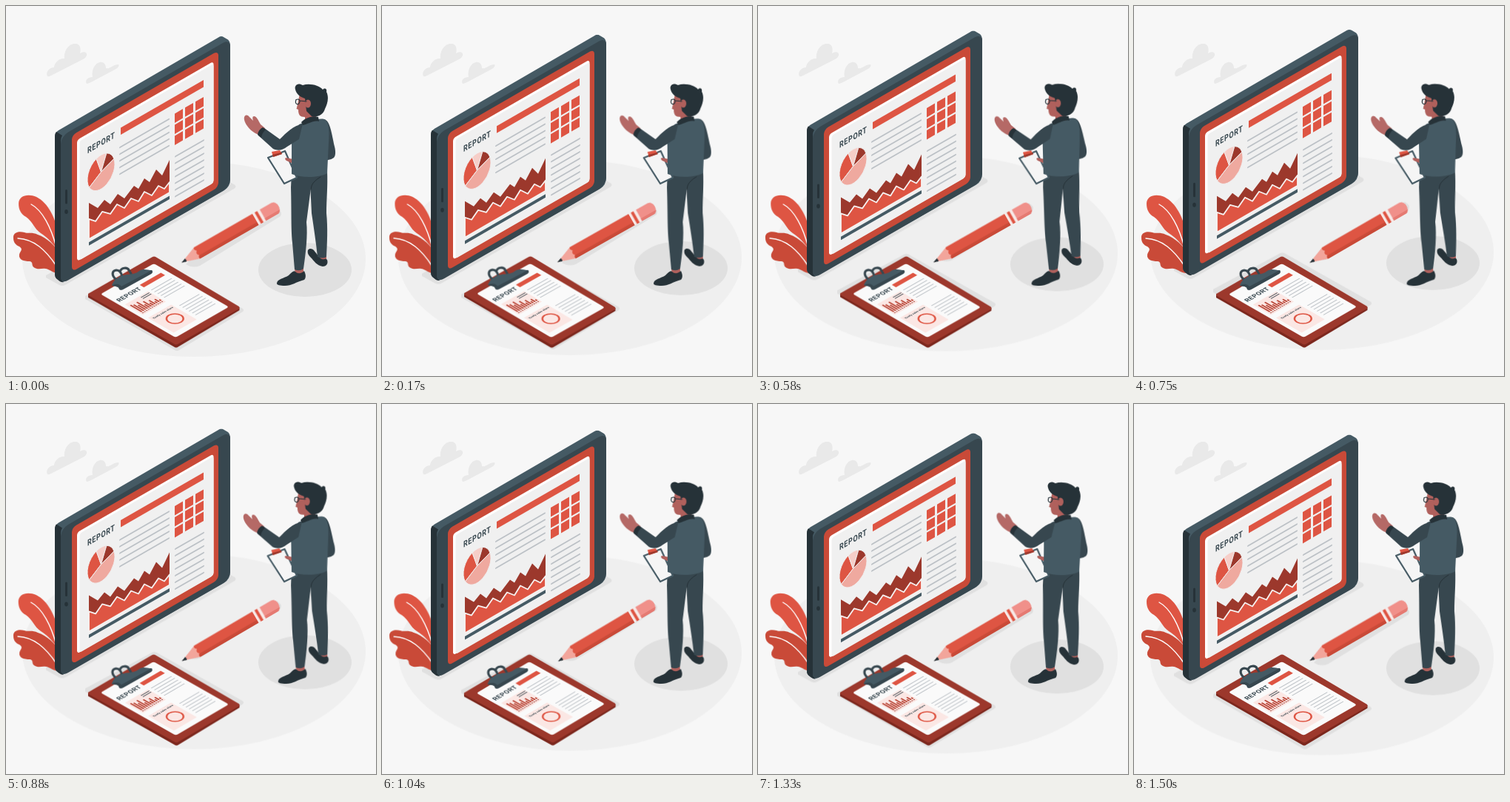
An HTML page that plays this animation: 500 px wide and 500 px high, repeating every 1.54 s.

```html
<!DOCTYPE html>
<html lang="en">
<head>
<meta charset="utf-8">
<title>Report presentation</title>
<style>
  html, body { margin: 0; width: 100%; height: 100%; overflow: hidden; background: #f7f7f7; }
  svg { display: block; width: 100vw; height: 100vh; }
  text { font-family: Roboto, sans-serif; font-weight: 700; fill: #37474f; }

  .float, .wind, .sway { animation: float .77s linear -40ms infinite alternate; }
  .wind { animation-name: wind; animation-delay: -425ms; }
  .sway { animation-name: sway; animation-delay: -185ms; transform-origin: 383px 236px; }
  .plant { transform-origin: 42px 308px; }
  .pencil { transform-origin: 304px 307px; }
  .board { transform-origin: 213px 400px; }

  @keyframes float { from { transform: translateY(.5px); } to { transform: translateY(-9.5px); } }
  @keyframes wind { from { transform: rotate(-1deg); } to { transform: rotate(1deg); } }
  @keyframes sway { from { transform: rotate(.5deg); } to { transform: rotate(-1.5deg); } }

  .red { fill: #de5543; }
  .brick { fill: #c94a38; }
  .deep { fill: #9c382c; }
  .navy { fill: #263238; }
  .slate { fill: #37474f; }
  .steel { fill: #455a64; }
  .skin { fill: #b0605c; }
  .shade { fill: #e0e0e0; }
  .line { fill: none; stroke-linecap: round; stroke-linejoin: round; }
</style>
</head>
<body>
<svg viewBox="0 0 500 500" xmlns="http://www.w3.org/2000/svg">
  <!-- clouds -->
  <g fill="#e9e9e9">
    <path d="M56 95C53 89 59 83 65 83C65 77 72 70 79 71C78 60 85 51 93 51C99 50 102 56 100 64C105 61 110 62 109 67Q108 70 104 72L61 94Q57 96 56 95Z"/>
    <path d="M109 105C106 100 111 96 117 96C115 87 120 77 127 76C132 75 135 79 135 84C140 86 144 79 152 79C154 82 149 85 145 87L113 104Z"/>
  </g>

  <!-- floor and shadows -->
  <g class="float">
    <ellipse cx="254" cy="342" rx="232" ry="132" fill="#efefef"/>
    <g class="shade">
      <ellipse cx="404" cy="356.5" rx="63" ry="36.5"/>
      <path d="M54 364L288 231L308 241Q313 244 308 247L80 377Q76 379 72 377L54 367Z"/>
      <path d="M107 392L198 343Q200 342 203 343L320 409Q322 411 320 413L234 465Q231 467 228 465L107 396Z"/>
      <path d="M243 349L262 330L366 274Q374 278 371 284L262 351Q252 355 243 349Z"/>
    </g>
  </g>

  <!-- plant -->
  <g class="wind plant">
    <path class="red" d="M17 267C17 256 30 253 41 258C57 266 67 286 72 312L70 330C62 319 55 312 47 307C38 301 36 291 27 285C20 281 17 275 17 267Z"/>
    <path class="brick" d="M10 314C9 306 17 304 25 306C31 308 35 305 43 309C55 313 67 324 74 336V361C66 362 62 358 57 356C50 353 45 357 39 354C33 351 38 346 32 345C24 345 17 343 18 336C19 331 24 329 18 325C13 323 10 319 10 314Z"/>
    <path class="line" stroke="#fff" stroke-width="1.4" d="M34 268C49 276 61 299 68 326M16 314C38 315 54 330 68 351"/>
  </g>

  <!-- tablet -->
  <g class="float">
    <path class="steel" d="M66 177Q66 171 71 168L287 42.5Q291 40 294 42L300 45.5Q303 48 303 54V234Q303 244 295 249L80 372Q76 374 72 371L69 369Q66 367 66 362Z"/>
    <path class="navy" d="M66 177Q66 172 68 170L76 175Q74 178 74 182V366Q74 371 78 373Q74 374 69 369Q66 367 66 362Z"/>
    <g transform="matrix(1 -.577 0 1 0 0)">
      <rect class="slate" x="74" y="219" width="229" height="200" rx="10"/>
      <rect class="brick" x="89" y="226" width="198" height="184.5" rx="6"/>
      <rect fill="#fff" x="96" y="236.5" width="184.5" height="164" rx="4"/>
      <rect fill="#f0f0f0" x="99.5" y="240" width="181" height="161" rx="3"/>
      <rect class="red" x="155" y="254" width="112" height="9.5"/>
      <path class="red" d="M228 277h11v12.5h-11zm14 0h11v12.5h-11zm14 0h11v12.5h-11zM228 292h11v12.5h-11zm14 0h11v12.5h-11zm14 0h11v12.5h-11zM228 307h11v12.5h-11zm14 0h11v12.5h-11zm14 0h11v12.5h-11z"/>
      <path class="line" stroke="#bcc1c6" stroke-width="2" d="M154 280h66m-66 9h66m-66 9h66m-66 9h66m-66 9h66M229 335.5h38m-38 9h38m-38 9h38m-38 9h38m-38 9h38m-38 9h38m-38 9h38"/>
      <rect class="steel" x="112" y="384" width="109" height="4.5"/>
      <g transform="translate(128.5 298.5) scale(18.5 23)" stroke="#f1f1f1" stroke-width=".04">
        <path class="red" d="M0 0L-.86 .51A1 1 0 0 1 -.35 -.94Z"/>
        <path fill="#f6cec8" d="M0 0L-.35 -.94A1 1 0 0 1 .4 -.92Z"/>
        <path class="deep" d="M0 0L.4 -.92A1 1 0 0 1 .94 -.34Z"/>
        <path fill="#efa99f" d="M0 0L.94 -.34A1 1 0 0 1 -.86 .51Z"/>
      </g>
    </g>
    <text transform="matrix(.78 -.45 0 1 110 199.5)" font-size="11.5" letter-spacing=".8">REPORT</text>
    <path class="deep" d="M112 266L124 273L133 262L141 268L151 254L160 260L173 243L179 247L187 233L194 238L203 221L211 229L221 208V252L112 315Z"/>
    <path class="red" stroke="#f6f2f1" stroke-width="1.8" stroke-linejoin="round" d="M112 288L121 291L130 278L141 281L150 268L160 273L169 260L179 264L187 251L197 256L206 243L214 247L221 238V252L112 315Z"/>
    <path class="line" stroke="#263238" stroke-width="3" d="M81.5 249.500V266"/>
    <ellipse class="navy" cx="81.500" cy="278" rx="2.300" ry="3"/>
  </g>

  <!-- clipboard -->
  <g class="wind board">
    <path fill="#7c271d" d="M111 389L230 450L315.500 407V411L232 461Q230 462 228 461L111 394Z"/>
    <path class="deep" d="M111 389L198 339Q200 338 202 339L315 406Q316 407.500 315 409L232 457Q230 458 228 457L111 391Z"/>
    <g transform="matrix(.866 -.5 .866 .5 127 390)">
      <rect fill="#fafafa" x="1" width="83" height="117" rx="3"/>
      <text x="5" y="25.500" font-size="8.800" letter-spacing=".4">REPORT</text>
      <rect class="red" x="44" y="18" width="33" height="6.500"/>
      <path fill="#fbe7e4" d="M6 33h36v28H6zM6 69h36v40H6z"/>
      <path fill="none" stroke="#bcc1c6" stroke-width="1.200" d="M46 34h32m-32 5h32m-32 5h32m-32 5h32m-32 5h32M47 77h31m-31 5h31m-31 5h31m-31 5h31m-31 5h31m-31 5h31"/>
      <path fill="none" stroke="#b94435" stroke-width="1.900" d="M9.500 56v-18m3 18v-16m3 16v-12m3 12v-17m3 17v-8m3 8v-13m3 13v-6m3 6v-10m3 10v-4m3 4v-7m3 7v-3"/>
      <path fill="none" stroke="#9c382c" stroke-dasharray="2 1" d="M8 58h33"/>
      <path fill="none" stroke="#37474f" d="M28 36h13m-13 3h13"/>
      <text x="9" y="75" font-size="3.800">Yearly sales share</text>
      <circle cx="26" cy="91" r="9.300" fill="none" stroke="#de5543" stroke-width="2"/>
    </g>
    <path class="line" stroke="#37474f" stroke-width="3.200" d="M149 370C142 364 143 358 149 357C154 357 156 361 157 366M154 359C156 353 164 353 166 357L169 362"/>
    <path class="steel" d="M143 378C144 372 150 368 153 366C161 361 172 365 180 358C186 354 191 357 197 357Q199 360 196 362L160 382Q156 385 153 383C153 379 148 379 143 378Z"/>
    <path class="slate" d="M143 378C148 375 152 375 156 379L197 357Q199 360 196 362L160 382Q156 385 153 383C153 379 148 379 143 378Z"/>
  </g>

  <!-- pencil -->
  <g class="wind pencil">
    <g transform="translate(238 346.500) rotate(-30)">
      <path fill="#f2a59b" d="M0 0L24-9.500L27 0L24 8Z"/>
      <path class="navy" d="M-1 0L6-2.500Q7 0 6 2.300Z"/>
      <path class="red" d="M24-9.500H115V8H24Q22 5 25 3Q21 0 25-4Q21-7 24-9.500Z"/>
      <path class="brick" d="M25 3.500H115V8H24Q22 6 25 3.500Z"/>
      <path fill="#f7e9e7" d="M115-9.500h11.500V8H115z"/>
      <path class="red" d="M118.500-9.500h4V8h-4z"/>
      <path fill="#f0908a" d="M126.500-9.500H145Q151-8 151-1T145 8H126.500Z"/>
      <path fill="#e57a72" d="M126.500 4H150Q148 8 145 8H126.500Z"/>
    </g>
  </g>

  <!-- presenter -->
  <g class="sway">
    <path class="skin" d="M390 354H402V364H391ZM421 336H433V346H424Z"/>
    <path class="navy" d="M366 375C366 369 376 368 382 364C386 360 389 357 391 359C395 363 400 361 403 358C406 364 405 368 403 370C392 373 386 378 377 378C370 378 366 377 366 375Z"/>
    <path class="navy" d="M408 330C410 327 414 328 416 330C420 335 424 341 427 342C431 343 432 340 434 343C436 349 432 352 428 352C420 351 416 344 412 340C409 337 407 334 408 330Z"/>
    <path class="slate" d="M411 238L413 280C416 300 419 320 421 339Q428 342 433 339C434 320 435 300 433 280C433 260 435 245 434 222H405Z"/>
    <path class="slate" d="M386 224L385 245C386 280 385 300 387 320L390 356Q397 359 402 355C405 335 408 310 406 292L412 246L426 228Z"/>
    <path class="line" stroke="#263238" d="M412 248L413 243Q415 237 425 231"/>
    <path fill="#f5f5f5" stroke="#455a64" stroke-width="2.200" stroke-linejoin="round" d="M354 205L377 196L393 232L376 240Z"/>
    <path class="red" d="M359 197L370 195L373 200L361 204Z"/>
    <path class="deep" d="M360 201L372 198L373 200L361 204Z"/>
    <path class="skin" d="M388 207L378 205Q376 207 379 209L388 213Z"/>
    <path class="slate" d="M430 153C438 155 440 172 444 190C446 198 445 203 443 205Q438 209 432 208Z"/>
    <path class="steel" d="M396 160C405 157 422 151 430 153C437 157 437 170 436 185L434 226C424 232 400 233 386 227V184Z"/>
    <path fill="#b56966" d="M350 165L342 174C334 172 326 164 323 157C320 150 323 146 327 148L334 155Q332 149 335 149C339 149 341 155 344 160Z"/>
    <path class="slate" d="M401 159C388 162 379 171 370 180L349 165C343 167 340 170 341 175L361 193C367 196 374 195 380 190L396 180Z"/>
    <path class="navy" d="M347 164L351 167Q346 171 345 178L340 174Q341 167 347 164Z"/>
    <path class="skin" d="M397 118L394 133L392.500 139L395 140C395 147 397 150 404 150V157L419 155V146L412 126Z"/>
    <path class="navy" d="M399 157C405 150 417 148 422 150L423 156C415 154 408 160 401 161Z"/>
    <path class="navy" d="M391 113C389 107 395 103 401 107C410 104 423 107 428 113C431 110 434 112 433 116C437 124 434 133 431 139C429 147 420 151 413 149L406 142L404 125C397 123 392 118 391 113Z"/>
    <ellipse class="skin" cx="408" cy="132" rx="4" ry="5.500"/>
    <path class="line" stroke="#263238" stroke-width="1.200" d="M392 126.500Q396 125 397 128Q397 132 394 133Q390 132 392 126.500ZM397 128L406 129"/>
  </g>
</svg>
</body>
</html>
```
